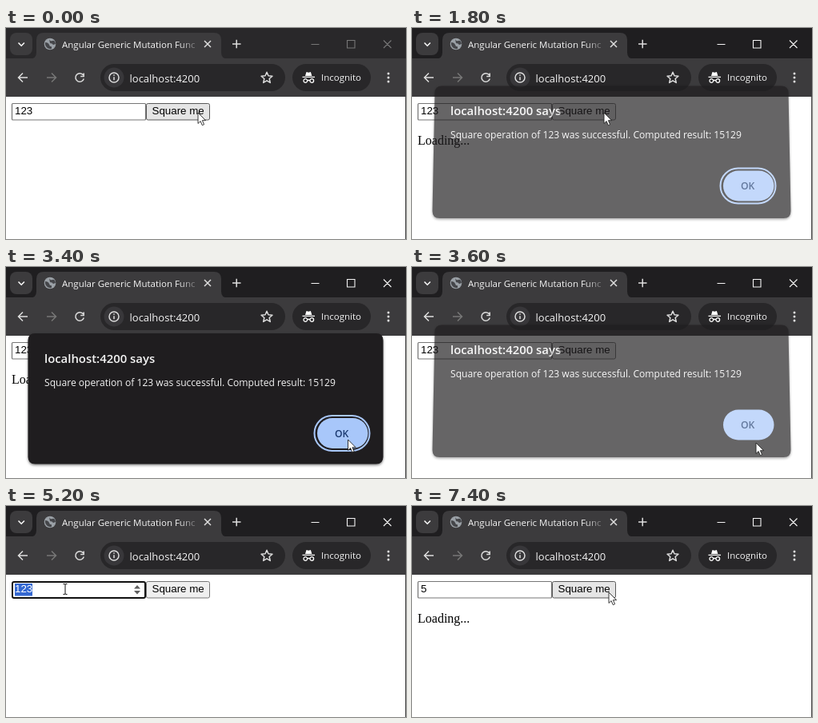
An HTML page that plays this animation: 500 by 264 pixels, repeating every 8 s.

```html
<!DOCTYPE html>
<html lang="en">
<head>
<meta charset="utf-8">
<title>Square me</title>
<style>
  html, body { margin: 0; width: 100%; height: 100%; overflow: hidden; background: #fff; }
  svg { display: block; width: 100%; height: 100%; }
  text { white-space: pre; }
  .ui { font-family: "Open Sans", "Noto Sans", sans-serif; fill: #f4f4f4; }
  .form { font: 13.333px "Liberation Sans", Arial, sans-serif; }
  .line { fill: none; stroke: #dedede; stroke-width: 1.5; }
</style>
</head>
<body>
<svg viewBox="0 0 500 264">
  <defs>
    <linearGradient id="fade" gradientUnits="userSpaceOnUse" x1="216" x2="240" y1="0" y2="0">
      <stop stop-color="#f4f4f4"/><stop offset="1" stop-color="#f4f4f4" stop-opacity=".15"/>
    </linearGradient>
    <filter id="shadow" x="-10%" y="-15%" width="120%" height="135%" color-interpolation-filters="sRGB">
      <feDropShadow dx="0" dy="1.5" stdDeviation="1.8" flood-opacity=".5"/>
    </filter>
  </defs>

  <!-- Page -->
  <rect width="500" height="264" fill="#fff"/>
  <rect id="input" fill="#fff"/>
  <rect id="selection" x="11" y="97" width="22" height="15.500" fill="#3367d1"/>
  <text id="value" class="form" x="11" y="108"></text>
  <path id="spinner" d="M160 103.500l4-4.500 4 4.500zM160 106l4 4.500 4-4.500z" fill="#606060"/>
  <rect id="button" x="175.500" y="94.500" width="79" height="20.500" rx="2"/>
  <text class="form" x="182.500" y="108">Square me</text>
  <text id="loading" x="7" y="146" font-family="Liberation Serif, Times, serif" font-size="16">Loading...</text>

  <!-- Tab strip -->
  <rect id="strip" width="500" height="40"/>
  <rect x="5" y="6" width="28" height="28" rx="8" fill="#3c3b3d"/>
  <path class="line" d="M15.500 18.500l3.700 3.700 3.700-3.700" style="stroke:#fff"/>
  <path d="M30 38.500q8 0 8-8V15q0-9 9-9H260q9 0 9 9V30.500q0 8 8 8z" fill="#3c3b3d"/>
  <circle cx="55" cy="20" r="7.300" fill="#9aa0a6"/>
  <path d="M49 18q4 0 5 3t3 2v3q-6 1-8-5zM54 14q1 3 4 2t4 4l-3 1q-1-2-4-2z" fill="#45464a"/>
  <text class="ui" x="70" y="24.500" font-size="11.5" style="fill:url(#fade)">Angular Generic Mutation Func</text>
  <path class="line" d="M248 16l8 8m0-8l-8 8M283 20h10.500M288.200 14.800v10.500"/>
  <path id="controls" d="M381.500 20.500h10M426.500 15.500h9.500v9.500h-9.500zM472 15.500l9.500 9.500m0-9.500l-9.500 9.500" fill="none" stroke-width="1.1"/>

  <!-- Toolbar -->
  <rect y="38" width="500" height="48" fill="#3c3b3d"/>
  <path class="line" d="M27 62H15.500M21 56.500L15.500 62l5.500 5.500"/>
  <path class="line" d="M51 62h11.500M57 56.500l5.500 5.500-5.500 5.500" style="stroke:#777"/>
  <path class="line" d="M96.500 58.800A5.300 5.300 0 1 0 97.300 63.500M97.200 56.500v4h-4"/>
  <rect x="118" y="45" width="231" height="34" rx="17" fill="#282729"/>
  <circle cx="135" cy="62" r="12.500" fill="#38373a"/>
  <circle class="line" cx="135" cy="62" r="6"/>
  <path class="line" d="M135 61.300v4M135 58.200v1.600"/>
  <text class="ui" x="154.500" y="67.500" font-size="13">localhost:4200</text>
  <path id="star" class="line" stroke-linejoin="round"/>
  <rect x="358" y="45" width="98" height="34" rx="17" fill="#282729"/>
  <path d="M374 60l1.500-5 2.700.8 2.700-.8 1.500 5zM370.500 60.800h15.500v1.300h-15.500z" fill="#fff"/>
  <path class="line" d="M372 66a2.300 2.300 0 1 0 4.600 0a2.300 2.300 0 1 0-4.600 0M380 66a2.300 2.300 0 1 0 4.600 0a2.300 2.300 0 1 0-4.600 0M376.600 65.500h3.400" style="stroke:#fff;stroke-width:1.3"/>
  <text class="ui" x="394" y="66.300" font-size="11.5">Incognito</text>
  <g fill="#dedede"><circle cx="478" cy="57" r="1.500"/><circle cx="478" cy="62" r="1.500"/><circle cx="478" cy="67" r="1.500"/></g>
  <rect x="499" y="86" width="1" height="178" fill="#4a4a4a"/>

  <!-- Alert -->
  <g id="dialog">
    <path id="panel" fill="#1f1d1f" filter="url(#shadow)"/>
    <text class="ui" x="48" y="119.500" font-size="14.9" font-weight="600">localhost:4200 says</text>
    <text class="ui" x="48" y="148.500" font-size="12.1">Square operation of 123 was successful. Computed result: 15129</text>
    <rect id="okRing" x="385.500" y="186" width="69" height="44" rx="22" fill="none" stroke="#a8c7fa" stroke-width="2"/>
    <rect x="389" y="189" width="63.500" height="38" rx="19" fill="#a8c7fa"/>
    <text x="411" y="212.500" class="ui" font-size="12.2" font-weight="600" style="fill:#1b3a70">OK</text>
  </g>

  <!-- Pointers, hotspot at 0,0 -->
  <path id="arrow" d="M0 0V13.500L3.100 10.600 5.300 15.700 7.600 14.700 5.400 9.700H9.600Z" fill="#fff" stroke="#222" stroke-width=".9"/>
  <path id="ibeam" d="M-2.500-6.500h1.700l.8.700.8-.7h1.700M0-6V6M-2.500 6.500h1.700l.8-.7.8.7h1.700" fill="none"/>
</svg>
<script>
const LOOP = 8000, STEP = 200;
const el = id => document.getElementById(id);
const set = (id, attrs) => Object.entries(attrs).forEach(([k, v]) => el(id).setAttribute(k, v));
const show = (id, on) => set(id, { visibility: on ? 'visible' : 'hidden' });
const within = (v, from, to) => v >= from && v < to;

// time, x, y
const pointerPath = [
  [0, 240, 106], [1800, 240, 106], [2400, 349, 137.5], [2600, 349, 137.5],
  [3200, 425, 212], [3600, 430, 220], [3800, 342, 194], [4800, 208, 122],
  [5000, 74, 104], [6000, 74, 104], [6400, 333, 125], [6800, 246, 108], [LOOP, 246, 108]
];

function pointerAt(t) {
  const i = pointerPath.findIndex(p => p[0] > t);
  const [t0, x0, y0] = pointerPath[i - 1], [t1, x1, y1] = pointerPath[i];
  const k = (t - t0) / (t1 - t0), eased = k * k * (3 - 2 * k);
  return [x0 + (x1 - x0) * eased, y0 + (y1 - y0) * eased];
}

// The panel tilts while it moves: its lower edge widens and drops by `tilt`.
function panelPath(tilt) {
  const left = 27.5 + tilt / 2, right = 471.5 - tilt / 2;
  const lowLeft = 27.5 - tilt, lowRight = 471.5 + tilt, bottom = 246.5 + tilt;
  return `M${left + 9} 83H${right - 9}q9 0 9 9L${lowRight} ${bottom - 9}q0 9-9 9H${lowLeft + 9}q-9 0-9-9L${left} 92q0-9 9-9z`;
}

const starPoints = Array.from({ length: 10 }, (_, i) => {
  const r = i % 2 ? 3.3 : 7.3, a = (i * 36 - 90) * Math.PI / 180;
  return `${326 + r * Math.cos(a)} ${62.5 + r * Math.sin(a)}`;
});
set('star', { d: `M${starPoints.join('L')}Z` });

function draw(t) {
  const [x, y] = pointerAt(t);
  const active = t >= 200;
  const open = within(t, 1800, 3800), closing = t >= 3600;
  const moving = closing || t === 1800;
  const focused = within(t, 5200, 7200);
  const selected = within(t, 5200, 6000);

  set('strip', { fill: active ? '#1f1e20' : '#29282a' });
  set('controls', { stroke: active ? '#f4f4f4' : '#777' });

  set('input', focused
    ? { x: 8, y: 95, width: 166, height: 20, rx: 2, stroke: '#101010', 'stroke-width': 2 }
    : { x: 7.5, y: 94.5, width: 167, height: 20.5, rx: 1, stroke: '#767676', 'stroke-width': 1.2 });
  el('value').textContent = t < 6000 ? '123' : '5';
  set('value', { fill: selected ? '#fff' : '#000' });
  show('selection', selected);

  const overInput = !open && within(x, 7, 175) && within(y, 94, 116);
  const hover = !open && within(x, 175, 255) && within(y, 94, 116);
  const pressed = t === 200 || t === 7200;
  show('spinner', focused || overInput);
  set('button', {
    fill: pressed ? '#f5f5f5' : hover ? '#e5e5e5' : '#efefef',
    stroke: hover && !pressed ? '#5a5a5a' : '#767676'
  });
  show('loading', within(t, 400, 3600) || t >= 7400);

  show('dialog', open);
  show('okRing', open && !closing);
  set('panel', { d: panelPath(moving ? 2 : 0) });
  set('dialog', moving
    ? { opacity: .68, transform: 'translate(0 -10.5)' }
    : { opacity: 1, transform: '' });

  const overMessage = open && within(x, 48, 413) && within(y, 130, 154);
  const textPointer = overInput || overMessage;
  const transform = `translate(${x} ${y})`;
  set('arrow', { transform });
  set('ibeam', { transform, stroke: overMessage ? '#e0e0e0' : '#111' });
  show('arrow', !textPointer);
  show('ibeam', textPointer);
}

const start = performance.now();
function tick() {
  const t = (performance.now() - start) % LOOP;
  draw(Math.floor(t / STEP) * STEP);
  requestAnimationFrame(tick);
}
tick();
</script>
</body>
</html>
```
